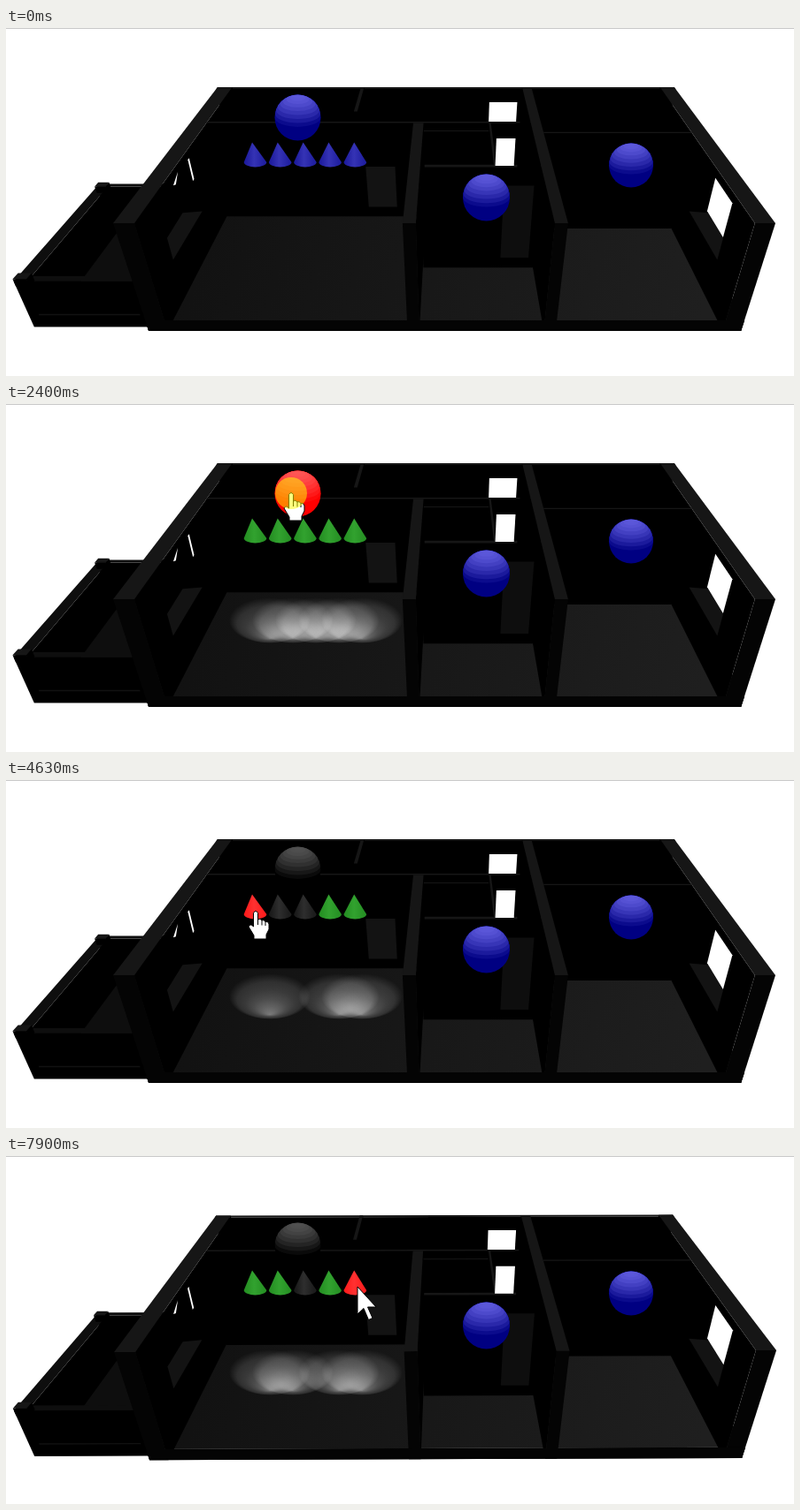
Write an HTML page with a canvas that moves like this. It is 890 px wide and 394 px high and loops after 8 s.

```html
<!DOCTYPE html>
<html>
<head>
<meta charset="utf-8">
<style>
html, body { margin: 0; width: 890px; height: 394px; overflow: hidden; background: #fff }
canvas { display: block }
</style>
</head>
<body>
<canvas width="890" height="394"></canvas>
<script>
const ctx = document.querySelector('canvas').getContext('2d');
const LOOP = 8000, CLICK = 140, TAU = Math.PI * 2;
const TOP = '#161616', FRONT = '#040404', RAIL = '#0e0e0e', DOOR = '#131313';

// shadow colour, then what full light adds
const COLORS = {
  blue: [0, 0, 130, 92, 88, 88],
  grey: [0, 0, 0, 80, 80, 80],
  green: [20, 120, 20, 52, 72, 46],
  red: [255, 0, 0, 0, 85, 85]
};
const shade = ([r, g, b, dr, dg, db], k) => `rgb(${r + dr * k},${g + dg * k},${b + db * k})`;
const clamp = v => Math.max(0, Math.min(1, v));
const ease = k => k * k * (3 - 2 * k);

// the cursor rests at x, y from time t on
const MOVES = [
  [330, 546, 394], [970, 256, 117], [1150, 322, 101], [3100, 327, 96], [3680, 338, 146],
  [4280, 311, 147], [4590, 282, 149], [5050, 366, 147], [5450, 506, 187], [5650, 340, 154],
  [6040, 328, 101], [6530, 336, 95], [7410, 338, 148], [7900, 397, 148]
];
const CLICKS = [1530, 2400, 3280, 3830, 4320, 4700, 5080, 6090, 6700, 7510];

function cursorAt(t) {
  const i = MOVES.findIndex(m => m[0] > t);
  if (i < 1) return MOVES[i ? MOVES.length - 1 : 0].slice(1);
  const [t0, x0, y0] = MOVES[i - 1], [t1, x1, y1] = MOVES[i];
  const span = Math.min(t1 - t0, 4 * Math.hypot(x1 - x0, y1 - y0));
  const k = ease(clamp(1 - (t1 - t) / span));
  return [x0 + (x1 - x0) * k, y0 + (y1 - y0) * k];
}

const coneX = i => 281.5 + i * 28.2;

// thing under the cursor: 0 sphere, 1-5 cones, -1 nothing
function hit(t) {
  const [x, y] = cursorAt(t);
  if (Math.hypot(x - 329.5, y - 101.5) < 26) return 0;
  const i = Math.round((x - coneX(0)) / 28.2);
  return y > 130 && y < 153 && i >= 0 && i < 5 && Math.abs(x - coneX(i)) < 12.7 ? i + 1 : -1;
}

// the sphere switches everything, a cone only its own lamp
function lampsAt(t) {
  let lamps = [0, 0, 0, 0, 0];
  for (const at of CLICKS.filter(c => c + CLICK <= t)) {
    const id = hit(at);
    if (id) lamps[id - 1] ^= 1;
    else lamps = lamps.fill(lamps.some(Boolean) ? 0 : 1);
  }
  return lamps;
}

// x across, z into the picture, h down from the top of the walls
let turn = 0;
function project(x, z, h) {
  x += turn * .005 * (.48 - z);
  z += turn * .009 * x;
  const w = 1 + .45 * z + .118 * h;
  return [501 + 748 * x / w, (496 + 195 * h) / w - 275];
}

function face(color, ...points) {
  ctx.beginPath();
  points.forEach(p => ctx.lineTo(...project(...p)));
  ctx.fillStyle = color;
  ctx.fill();
}
const flat = (color, x0, x1, z0, z1, h) => face(color, [x0, z0, h], [x1, z0, h], [x1, z1, h], [x0, z1, h]);
const upright = (color, x0, x1, z, h0, h1) => face(color, [x0, z, h0], [x1, z, h0], [x1, z, h1], [x0, z, h1]);
const side = (color, x, z0, z1, h0, h1) => face(color, [x, z0, h0], [x, z1, h0], [x, z1, h1], [x, z0, h1]);

function box(x0, x1, z0, z1, h0 = 0, h1 = 1, top = TOP) {
  if (x0 > 0 || x1 < 0) side('#000', x0 > 0 ? x0 : x1, z0, z1, h0, h1);
  upright(z0 ? '#000' : FRONT, x0, x1, z0, h0, h1);
  flat(top, x0, x1, z0, z1, h0);
}

// back to front
const WALLS = [
  [-.508, .492, .982, 1], [-.508, -.476, 0, 1], [.461, .492, 0, 1], [-.194, -.187, .76, 1],
  [-.476, .16, .66, .671], [-.05, .08, .589, .596], [.179, .461, .575, .584], [.077, .081, .34, .66],
  [-.05, .162, .326, .342], [-.071, -.051, 0, .66], [.159, .179, 0, 1]
];

function drawHouse() {
  // balcony
  flat('#000', -.707, -.5, .02, .6, 1);
  box(-.707, -.49, .58, .6, .545, 1, RAIL);
  flat(RAIL, -.68, -.5, .05, .56, .88);
  box(-.707, -.685, .03, .59, .55, 1, RAIL);
  box(-.707, -.5, .02, .045, .55, 1, RAIL);
  upright('#111', -.69, -.52, .02, .87, .882);
  for (const z of [.57, .02]) box(-.707, -.685, z, z + .03, .53, .6);

  const floor = ctx.createLinearGradient(190, 200, 780, 350);
  floor.addColorStop(0, '#111');
  floor.addColorStop(1, '#1f1f1f');
  box(-.508, .492, 0, 1, .89, 1, floor);
  WALLS.forEach(w => box(...w));
  upright(FRONT, -.508, .492, 0, .89, 1);

  // openings
  upright(DOOR, -.171, -.111, .66, .447, .89);
  upright(RAIL, .096, .149, .326, .17, .89);
  for (const x of [-.476, .461])
    face(DOOR, [x, .45, .61], [x, .3, .39], [x, .155, .39], [x, .155, .6]);
  upright('#fff', .0875, .149, .982, .142, .356);
  upright('#fff', .093, .131, .66, .154, .437);
  side('#fff', .461, .157, .31, .076, .388);
  side('#fff', -.476, .434, .447, .077, .28);
  face('#fff', [-.476, .34, .06], [-.476, .285, .108], [-.476, .304, .127]);
}

function sphere(x, y, r, color) {
  ctx.save();
  ctx.beginPath();
  ctx.arc(x, y, r, 0, TAU);
  ctx.fillStyle = shade(color, 0);
  ctx.fill();
  ctx.clip();
  for (let i = 9; i > 0; i--) {
    const a = i * Math.PI / 18, rx = r * Math.sin(a);
    const cy = y - r * Math.cos(a) * .92;
    ctx.beginPath();
    if (i < 6) ctx.ellipse(x, cy, rx, rx * .4, 0, 0, TAU);
    else {
      ctx.ellipse(x, cy, rx, rx * .4, 0, 0, Math.PI);
      ctx.lineTo(x - r, y - r);
      ctx.lineTo(x + r, y - r);
    }
    ctx.fillStyle = shade(color, Math.cos(a - .12));
    ctx.fill();
  }
  ctx.restore();
}

function cone(i, color) {
  const x = coneX(i), y = 152;
  const g = ctx.createLinearGradient(x - 12, 0, x + 12, 0);
  [.3, .58, .36].forEach((k, n) => g.addColorStop(n * .45, shade(color, k)));
  ctx.beginPath();
  ctx.moveTo(x - 3.5 + i * .6, 129.5);
  ctx.lineTo(x + 12.8, y);
  ctx.ellipse(x, y, 12.8, 5.4, 0, 0, Math.PI);
  ctx.fillStyle = g;
  ctx.fill();
}

// light on the floor, strongest at its near edge
function pool(i) {
  ctx.save();
  ctx.globalCompositeOperation = 'lighter';
  ctx.translate(298 + i * 26, 245);
  ctx.scale(46, 25.8);
  const g = ctx.createRadialGradient(0, .8, 0, 0, 0, 1);
  [.4, .3, .21, .15, .11, 0].forEach((a, n) => g.addColorStop(n / 5, `rgba(255,255,255,${a})`));
  ctx.beginPath();
  ctx.arc(0, 0, 1, 0, TAU);
  ctx.fillStyle = g;
  ctx.fill();
  ctx.restore();
}

const ARROW = new Path2D('M0 0V31L7 24.5 12.5 37.5 17 35.5 11.5 23H21z');
const HAND = new Path2D('M-2.5 1.5Q0-2.5 2.5 1.5V9Q5 7 7 10 9 8.5 11 11.5 14 10.5 15 14V20L12 26V31H-2V27L-8 17Q-6 13-2.5 17z');
const KNUCKLES = new Path2D('M2.5 9V15M7 10V15.5M11 11.5V16');

function cursor(t, hover) {
  const [x, y] = cursorAt(t), [px, py] = cursorAt(t - 30);
  const hand = hover >= 0 && Math.hypot(x - px, y - py) < .1;
  ctx.save();
  ctx.translate(x, y);
  ctx.fillStyle = '#fff';
  ctx.strokeStyle = '#000';
  ctx.fill(hand ? HAND : ARROW);
  ctx.stroke(hand ? HAND : ARROW);
  if (hand) ctx.stroke(KNUCKLES);

  const since = t - CLICKS.filter(c => c <= t).pop();
  if (since < 200) {
    ctx.fillStyle = `rgba(255,255,0,${.5 * clamp((200 - since) / 60)})`;
    ctx.beginPath();
    ctx.arc(0, 0, 18, 0, TAU);
    ctx.fill();
  }
  ctx.restore();
}

function draw() {
  const t = performance.now() % LOOP;
  const hover = hit(t - 70), lamps = lampsAt(t);
  const idle = t < CLICKS[0] + CLICK ? 'blue' : 'grey';
  const pick = (id, color) => COLORS[hover === id ? 'red' : color];

  turn = ease(clamp((t - 5300) / 130));
  ctx.clearRect(0, 0, 890, 394);
  ctx.fillStyle = '#c8c8c8';
  ctx.fillRect(0, 0, 890, 1);
  drawHouse();
  lamps.forEach((on, i) => on && pool(i));
  sphere(329.5, 101.5, 26, pick(0, idle));
  sphere(542.5, 192, 26.5, COLORS.blue);
  sphere(706, 155.5, 25, COLORS.blue);
  lamps.forEach((on, i) => cone(i, pick(i + 1, on ? 'green' : idle)));
  if (t >= MOVES[0][0]) cursor(t, hover);
  requestAnimationFrame(draw);
}
draw();
</script>
</body>
</html>
```
